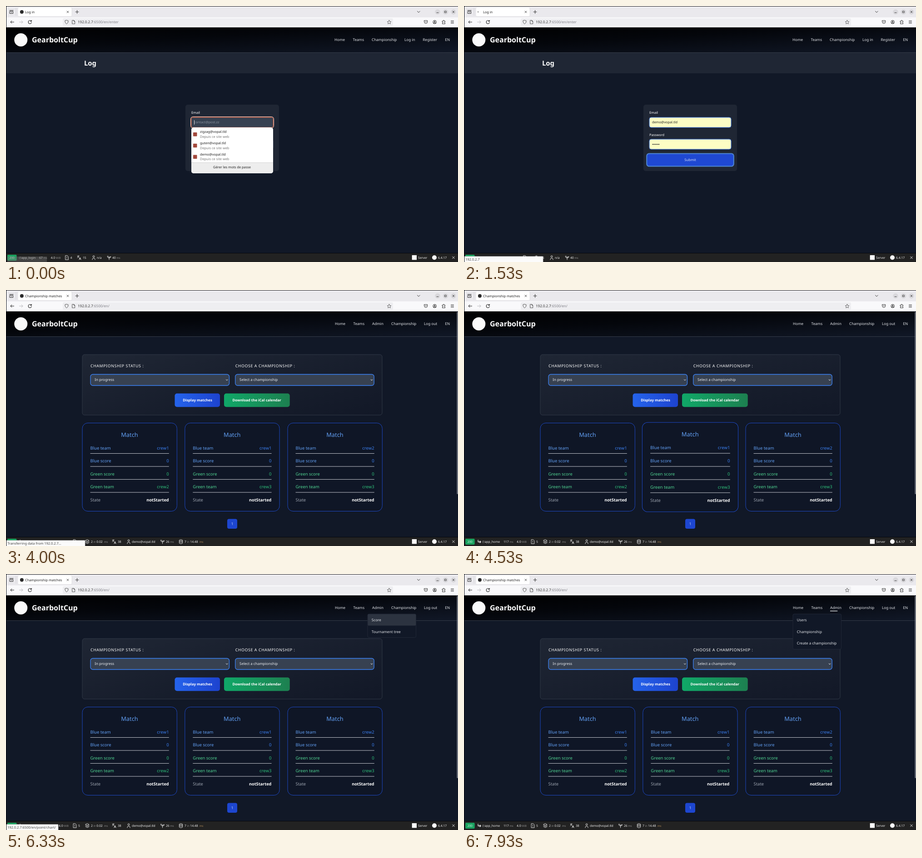
Animation, 995 px wide and 563 px high, one loop 8 s. Source, as an HTML page:

```html
<!DOCTYPE html>
<html lang="en">
<head>
<meta charset="utf-8">
<title>Log in</title>
<style>
html, body { margin: 0; width: 100%; height: 100%; overflow: hidden; background: #111827; }
svg { display: block; width: 995px; height: 563px; }
text { font-family: "Noto Sans", "Open Sans", sans-serif; text-rendering: geometricPrecision; white-space: pre; }
</style>
</head>
<body>
<svg id="stage" viewBox="0 0 995 563" xmlns="http://www.w3.org/2000/svg">
  <defs>
    <linearGradient id="head" x1="0" y1="0" x2="1" y2="1"><stop offset="0" stop-color="#000"/><stop offset=".4" stop-color="#04060b"/><stop offset="1" stop-color="#111827"/></linearGradient>
    <linearGradient id="panel" x1="0" y1="0" x2="1" y2="1"><stop stop-color="#1f2634"/><stop offset="1" stop-color="#121827"/></linearGradient>
    <linearGradient id="blue"><stop stop-color="#2563eb"/><stop offset="1" stop-color="#1d43cf"/></linearGradient>
    <linearGradient id="green"><stop stop-color="#10a868"/><stop offset="1" stop-color="#1d8050"/></linearGradient>
  </defs>
</svg>
<script>
const LOOP = 8000;
const HOST = "192.0.2.7", PORT = ":6500";
const stage = document.getElementById("stage");

function el(parent, tag, attrs) {
  const node = document.createElementNS("http://www.w3.org/2000/svg", tag);
  for (const key in attrs) node.setAttribute(key, attrs[key]);
  return parent.appendChild(node);
}
const group = parent => el(parent, "g", {});
const rect = (p, x, y, width, height, fill, rx = 0, more = {}) =>
  el(p, "rect", { x, y, width, height, fill, rx, ...more });
const circle = (p, cx, cy, r, fill) => el(p, "circle", { cx, cy, r, fill });
const line = (p, d, stroke = "#333", width = 1) =>
  el(p, "path", { d, stroke, "stroke-width": width, fill: "none", "stroke-linecap": "round", "stroke-linejoin": "round" });
function text(p, x, y, str, size, fill, weight = 400, anchor = "start", more = {}) {
  const node = el(p, "text", { x, y, fill, "font-size": size, "font-weight": weight, "text-anchor": anchor, ...more });
  node.textContent = str;
  return node;
}
function rich(p, x, y, parts, size) {
  const node = text(p, x, y, "", size, "#eee");
  for (const [str, fill, scale = 1] of parts)
    el(node, "tspan", { fill, "font-size": size * scale }).textContent = str;
  return node;
}
const cross = (p, x, y, r, stroke = "#333", w = 1) =>
  line(p, `M${x - r} ${y - r}l${2 * r} ${2 * r}m0 ${-2 * r}l${-2 * r} ${2 * r}`, stroke, w);
const ring = (p, cx, cy, r, stroke = "#333", width = 1) =>
  el(p, "circle", { cx, cy, r, fill: "none", stroke, "stroke-width": width });

const show = (node, on) => { node.style.display = on ? "" : "none"; };
const fade = (node, v) => { node.style.opacity = v; };
const span = (t, from, to) => t >= from && t < to;
function ramp(t, from, to) {
  const k = Math.min(1, Math.max(0, (t - from) / (to - from)));
  return k * k * (3 - 2 * k);
}
function pick(t, steps) {
  let value = steps[0][1];
  for (const [time, v] of steps) if (t >= time) value = v;
  return value;
}

// Page
rect(stage, 0, 0, 995, 563, "#111827");
const page = group(stage);
rect(page, 0, 47, 995, 55, "url(#head)");
rect(page, 0, 102, 995, 1, "#353c49");
circle(page, 32.7, 74.5, 14.5, "#fafafa");
text(page, 57, 80, "GearboltCup", 16, "#fff", 700);

const login = group(page), home = group(page);

function nav(parent, items) {
  for (const [x, str] of items) text(parent, x, 76.6, str, 8.15, "#e5e7eb");
}

// Login view
nav(login, [[723, "Home"], [763.5, "Teams"], [805, "Championship"], [877, "Log in"], [917.5, "Register"], [966.5, "EN"]]);
rect(login, 0, 103, 995, 45, "#1f2634");
text(login, 172, 130.7, "Log", 14.8, "#fff", 700);
rect(login, 395, 217, 206, 146, "#1f2634", 5);
text(login, 408, 237.4, "Email", 7.4, "#fff", 500);
text(login, 408, 285.7, "Password", 7.3, "#fff", 500);

function field(y) {
  rect(login, 408, y, 180, 22, "#374151", 4, { stroke: "#4b5a72", "stroke-width": .8 });
  const filled = group(login);
  rect(filled, 408, y, 180, 22, "#fdfdc4", 4, { stroke: "#3b74e8", "stroke-width": 1 });
  return filled;
}
const emailFill = field(245), passFill = field(293);
text(emailFill, 414, 258.4, "demo@vopal.tld", 7.3, "#222");
for (let i = 0; i < 6; i++) circle(passFill, 415.4 + i * 2.75, 304.2, 1.05, "#222");
const hint = text(login, 414, 258.4, "contact@post.zz", 7.25, "#8b93a0");
const caret = line(login, "M414.5 251.5v9", "#fff", .8);
const focus = group(login);
rect(focus, 407.7, 244.7, 180.6, 22.6, "none", 4, { stroke: "#b8583f", "stroke-width": 1.4 });
rect(focus, 406.5, 243.5, 183, 25, "none", 5, { stroke: "#f6d3c9", "stroke-width": 1 });

const submit = group(login);
rect(submit, 408, 326, 180, 25, "#2860e6", 4);
const submitDark = rect(submit, 408, 326, 180, 25, "#1f48d2", 4);
const submitRing = rect(submit, 407.2, 325.2, 181.6, 26.6, "none", 5, { stroke: "#5c9df2", "stroke-width": 2 });
text(submit, 498, 341.2, "Submit", 7.3, "#d4defa", 400, "middle");

// Saved logins list
const list = group(login);
rect(list, 408, 267, 180, 101, "#fff", 5);
const rows = ["zigzag@vopal.tld", "guten@vopal.tld", "demo@vopal.tld"].map((name, i) => {
  const y = 270 + i * 24.7;
  const row = group(list);
  rect(row, 412, y + 8, 8.5, 8.5, "#a2493d", 1);
  text(row, 427, y + 9.2, name, 7.4, "#222");
  text(row, 427, y + 20, "Depuis ce site web", 7.4, "#777");
  const over = group(list);
  rect(over, 408.5, y - .3, 179, 24.7, "#b95c3f");
  rect(over, 413, y + 9, 6.5, 6.5, "#a2493d", 1);
  text(over, 427, y + 9.2, name, 7.4, "#f3d6cc");
  text(over, 427, y + 20, "Depuis ce site web", 7.4, "#dfa48f");
  ring(over, 576, y + 12, 3, "#f6ded5", .9);
  ring(over, 576, y + 12, 3.9, "#f6ded5", .9).setAttribute("stroke-dasharray", "1.5 1.56");
  ring(over, 576, y + 12, 1.2, "#f6ded5", .7);
  return over;
});
el(list, "path", { d: "M408 344h180v19a5 5 0 0 1-5 5h-170a5 5 0 0 1-5-5z", fill: "#ededed" });
rect(list, 408, 344, 180, .8, "#cfcfcf");
text(list, 497.5, 357, "Gérer les mots de passe", 7.36, "#222", 400, "middle");

// Home view
nav(home, [[724, "Home"], [764.5, "Teams"], [806, "Admin"], [848, "Championship"], [920, "Log out"], [966.5, "EN"]]);
rect(home, 168, 142, 660, 133, "url(#panel)", 5, { stroke: "#353d4b", "stroke-width": .9 });
function select(x, label, value) {
  text(home, x, 169.8, label, 8.8, "#fff", 500, "start", { "letter-spacing": .62 });
  rect(home, x, 185.5, 305.5, 24.5, "#374151", 5, { stroke: "#3b82f6", "stroke-width": 1.3 });
  text(home, x + 9.3, 200.3, value, 8, "#eef0f3");
  line(home, `M${x + 298.5} 197l1.8 1.9l1.8-1.9`, "#fff", 1);
}
select(186, "CHAMPIONSHIP STATUS :", "In progress");
select(504.7, "CHOOSE A CHAMPIONSHIP :", "Select a championship");
rect(home, 371.5, 227.5, 99.5, 29.7, "url(#blue)", 5);
text(home, 421.5, 245.2, "Display matches", 7.9, "#fff", 700, "middle");
rect(home, 480, 227.5, 144.7, 29.7, "url(#green)", 5);
text(home, 552.2, 245.2, "Download the iCal calendar", 7.85, "#fff", 700, "middle");

function matchCard(x, blue, green) {
  const card = group(home);
  rect(card, x, 292.5, 208.3, 194, "#0f1626", 12, { stroke: "#1d48c4", "stroke-width": 1 });
  text(card, x + 104, 323.4, "Match", 12.8, "#62a0f5", 500, "middle");
  const lines = [
    ["Blue team", blue, "#62a0f5", "#3b7ff0"],
    ["Blue score", "0", "#62a0f5", "#3b7ff0"],
    ["Green score", "0", "#50d492", "#2fc07a"],
    ["Green team", green, "#50d492", "#2fc07a"],
    ["State", "notStarted", "#9ca3af", "#fff"]
  ];
  lines.forEach(([label, value, c1, c2], i) => {
    const y = 350.5 + i * 28.5, last = i === 4;
    text(card, x + 17.5, y, label, 9.45, c1, last ? 400 : 500);
    text(card, x + 190.6, y, value, last ? 9.15 : 9.5, c2, last ? 700 : 500, "end");
    if (!last) rect(card, x + 17.5, y + 8.6, 173.3, .9, "#d5d8de");
  });
  return card;
}
matchCard(168, "crew1", "crew2");
const midCard = matchCard(393.8, "crew1", "crew3");
matchCard(620, "crew2", "crew3");
rect(home, 487, 503.5, 22, 21.5, "#1d46d0", 4);
text(home, 498, 517.2, "1", 8, "#c3d5fb", 400, "middle");
rect(home, 992.6, 48, 2, 401, "#8b8f97", 1);

function menu(x, w, items) {
  const box = group(home);
  rect(box, x, 88, w, items.length * 25.8, "#111827", 3, { stroke: "#262d3b", "stroke-width": .8 });
  const hover = rect(box, x + .4, 88.3, w - .8, 25.2, "#2c3340", 2);
  items.forEach((str, i) => text(box, x + 8.8, 103.8 + i * 25.8, str, 8.1, "#e5e7eb"));
  return { box, hover };
}
const champMenu = menu(796, 106.6, ["Score", "Tournament tree"]);
const adminMenu = menu(724, 106.6, ["Users", "Championship", "Create a championship"]);
const champLine = rect(home, 848, 80.8, 0, 1.2, "#fff");
const adminLine = rect(home, 806, 80.8, 0, 1.2, "#fff");

// Debug toolbar
rect(stage, 0, 543, 995, 1.2, "#05070c");
rect(stage, 0, 544, 995, 19, "#222");
const bar = group(stage), loginBar = group(stage), homeBar = group(stage);
const GREY = "#8d8d8d", LIGHT = "#eee", TOOL = 6.75;
const tool = (p, x, ...parts) => rich(p, x, 556, parts, TOOL);
const ms = str => [[str, LIGHT], [" ms", GREY, .88]];

const icons = {
  file: (p, x) => line(p, `M${x - 3} 549h4l2.4 2.4v6.6h-6.4zM${x} 552v2m0 2v.2`, LIGHT, .9),
  lang: (p, x) => line(p, `M${x - 4} 550h4.5m-2.2-1v1q-.4 3-2.3 4m1-3l3 3M${x} 558l2-5l2 5m-3.2-1.6h2.4`, LIGHT, .9),
  user: (p, x) => { ring(p, x, 551, 1.9, LIGHT, .9); line(p, `M${x - 3} 558v-1q0-2.4 3-2.4t3 2.4v1`, LIGHT, .9); },
  plant: (p, x) => line(p, `M${x} 558v-4q0-3 4-3q0 3-4 3q-4 0-4-4q4 0 4 4`, LIGHT, .9),
  layers: (p, x) => line(p, `M${x} 549l4 2l-4 2l-4-2zM${x - 4} 553.3l4 2l4-2m-8 2.3l4 2l4-2`, LIGHT, .9),
  base: (p, x) => {
    el(p, "ellipse", { cx: x, cy: 550.5, rx: 3.6, ry: 1.4, fill: "none", stroke: LIGHT, "stroke-width": .9 });
    line(p, `M${x - 3.6} 550.5v6.4q3.6 2.6 7.2 0v-6.4m-7.2 3.2q3.6 2.6 7.2 0`, LIGHT, .9);
  }
};
rect(bar, 3, 547, 20.5, 13, "#1aa260", 2);
text(bar, 13.2, 556, "200", TOOL, "#d8f3e4", 400, "middle");
rect(bar, 893.7, 548, 10.3, 10.3, "#fff");
tool(bar, 907, ["Server", LIGHT]);
circle(bar, 943, 553.2, 5, "#fff");
tool(bar, 951, ["6.4.17", LIGHT]);
cross(bar, 985, 553.3, 2.4, "#ddd", 1);

tool(loginBar, 28, ["@", GREY], ["app_login", LIGHT]);
tool(loginBar, 73, ...ms("67"));
tool(loginBar, 98.5, ["4.0", LIGHT], [" MiB", GREY, .88]);
icons.file(loginBar, 134); tool(loginBar, 141.5, ["4", LIGHT]);
icons.lang(loginBar, 161); tool(loginBar, 169, ["15", LIGHT]);
icons.user(loginBar, 193); tool(loginBar, 200, ["n/a", LIGHT]);
icons.plant(loginBar, 227); tool(loginBar, 234, ...ms("40"));

line(homeBar, "M31 550v4h6m-2-2l2 2l-2 2", LIGHT, 1.3);
tool(homeBar, 39.5, ["@", GREY], ["app_home", LIGHT]);
tool(homeBar, 87, ...ms("117"));
tool(homeBar, 116, ["4.0", LIGHT], [" MiB", GREY, .88]);
icons.file(homeBar, 151.5); tool(homeBar, 159, ["5", LIGHT]);
icons.layers(homeBar, 179); tool(homeBar, 187, ["2", LIGHT], [" in ", GREY, .9], ["0.02 ", LIGHT], [" ms", GREY, .88]);
icons.lang(homeBar, 238); tool(homeBar, 246, ["38", LIGHT]);
icons.user(homeBar, 270); tool(homeBar, 277, ["demo@vopal.tld", LIGHT]);
icons.plant(homeBar, 344.5); tool(homeBar, 352, ...ms("26"));
icons.base(homeBar, 385); tool(homeBar, 393, ["7", LIGHT], [" in ", GREY, .9], ["14.48 ", LIGHT], [" ms", "#b08a5a", .88]);

// Link and loading status
const ghost = rect(stage, 3, 551, 87, 12, "#777", 0, { opacity: .4 });
const status = group(stage);
const statusBox = rect(status, 0, 550.7, 174, 13, "#fbfbfb", 1, { stroke: "#c8c8c8", "stroke-width": .6 });
const statusText = text(status, 3, 559.8, "", 7.45, "#444");

// Browser frame
const chrome = group(stage);
rect(chrome, 0, 0, 995, 25.5, "#eae9ed");
rect(chrome, 0, 25, 995, 22, "#f9f9fb");
rect(chrome, 0, 0, 995, 1, "#222");
rect(chrome, 0, 0, 1, 563, "#0a0d14");
rect(chrome, 26, 3, 119, 20, "#fff", 2.5, { stroke: "#d2d1d6", "stroke-width": .6 });
rect(chrome, 125, 27.3, 727, 16, "#eeeef1", 2.5);
line(chrome, "M8 9.5h8M8.5 11.5h7v5h-7zM10.6 13.2l1.4 1.4l1.4-1.4", "#333", 1);
line(chrome, "M22 5v16", "#cfced3", .8);
cross(chrome, 136, 13, 2, "#444", .9);
line(chrome, "M153 13h7m-3.5-3.5v7", "#333", 1);
line(chrome, "M905.5 11.5l2.8 2.8l2.8-2.8", "#333", 1);
for (const x of [950, 967.5, 985]) circle(chrome, x, 13, 5.8, "#d9d8dc");
line(chrome, "M948 14.7h4M965.8 11.3h3.4v3.4h-3.4z", "#333", .9);
cross(chrome, 985, 13, 1.8, "#333", .9);
line(chrome, "M17.5 35.3h-7.5m3-3l-3 3l3 3", "#222", 1);
line(chrome, "M29.5 35.3h7.5m-3-3l3 3l-3 3", "#b9b9bd", 1);
const reload = line(chrome, "M55.4 33a3.6 3.6 0 1 0 .8 3M56.2 31.2v2.4h-2.4", "#222", 1.1);
const stop = cross(chrome, 52.5, 35.3, 2.8, "#222", 1.1);
line(chrome, "M133.5 31.3l3.6 1.2q.2 5-3.6 7q-3.8-2-3.6-7z", "#444", .9);
line(chrome, "M146 31.5h3.4l2.2 2.2v5.5h-5.6zM149.4 31.5v2.2h2.2", "#444", .9);
line(chrome, "M843.5 31.2l1.3 2.8l3 .4l-2.2 2l.6 3l-2.7-1.5l-2.7 1.5l.6-3l-2.2-2l3-.4z", "#444", .8);
line(chrome, "M920.7 32h7v3q0 3.5-3.5 3.5t-3.5-3.5zM922.6 34.2l1.6 1.6l1.6-1.6", "#333", 1);
ring(chrome, 943.7, 35.3, 3.8);
circle(chrome, 943.7, 34.2, 1.4, "#333");
line(chrome, "M941.5 37.5q2.2-1.8 4.4 0", "#333", 1.2);
line(chrome, "M960.5 33h2v-1.5h2v1.5h2v2.2h-1.4v2h1.4v2.2h-6v-2.2h1.4v-2h-1.4z", "#333", .9);
line(chrome, "M979.5 32.6h6m-6 2.7h6m-6 2.7h6", "#333", 1);
const favicon = circle(chrome, 34.8, 13, 4, "#2b2b2b");
const spinner = circle(chrome, 31, 13, 1.1, "#555");
const title = text(chrome, 42, 15.8, "", 7.35, "#222");
const address = rich(chrome, 158, 38.2, [[HOST, "#333"], ["", "#808088"]], 8);

const DOT = [[1400, 31], [1800, 34], [1930, 38], [2200, 34], [2460, 31], [2600, 34], [2860, 31], [3000, 37], [3330, 34], [3530, 31]];
const TITLE = [[0, "Log in"], [3330, HOST + PORT + "/en/"], [4000, "Championship matches"]];
const PATH = [[0, "/en/enter"], [3330, "/en/"]];
const STATUS = [
  [0, ""], [1400, HOST], [1730, `Waiting for ${HOST}…`], [3330, `Transferring data from ${HOST}…`], [4330, ""],
  [5800, HOST + PORT + "/en/point/chart/"], [6600, ""]
];
const ROW = [[0, -1], [200, 0], [260, 1], [600, 2]];

function setText(node, str) {
  if (node.textContent !== str) node.textContent = str;
}
function zoom(node, s, cx, cy) {
  node.setAttribute("transform", `translate(${cx} ${cy}) scale(${s}) translate(${-cx} ${-cy})`);
}

function render(t) {
  const atHome = t >= 3800, filled = t >= 800, loading = span(t, 1400, 4000);
  show(login, !atHome);
  show(home, atHome);
  show(loginBar, t < 4000);
  show(homeBar, t >= 4000);

  show(list, !filled);
  rows.forEach((row, i) => show(row, pick(t, ROW) === i));
  show(caret, t < 260);
  show(hint, !filled);
  show(emailFill, filled);
  show(passFill, filled);
  show(focus, t < 1400);
  const hover = ramp(t, 800, 1000) - ramp(t, 2460, 2660);
  zoom(submit, 1 + .055 * hover, 498, 338.5);
  fade(submitDark, hover);
  fade(submitRing, ramp(t, 1400, 1530) * (1 - .2 * hover));

  zoom(midCard, 1 + .014 * (ramp(t, 4130, 4330) - ramp(t, 4790, 4900)), 498, 389.5);
  fade(champMenu.box, ramp(t, 5200, 5460) - ramp(t, 6730, 6930));
  fade(champMenu.hover, ramp(t, 5600, 5800) - ramp(t, 6460, 6600));
  const champ = ramp(t, 5200, 5460) - ramp(t, 5600, 5800) + ramp(t, 6460, 6660) - ramp(t, 6730, 6930);
  champLine.setAttribute("width", Math.max(0, 55 * champ));
  fade(adminMenu.box, ramp(t, 7330, 7600));
  fade(adminMenu.hover, 0);
  adminLine.setAttribute("width", 25 * Math.max(0, (t - 7600) / 510));

  show(ghost, t < 60);
  const note = pick(t, STATUS);
  show(status, note !== "");
  setText(statusText, note);
  statusBox.setAttribute("width", atHome && t > 5000 ? 115 : 174);

  show(favicon, !loading);
  show(spinner, loading);
  spinner.setAttribute("cx", pick(t, DOT));
  show(stop, span(t, 1730, 4000));
  show(reload, !span(t, 1730, 4000));
  setText(title, pick(t, TITLE));
  setText(address.lastChild, PORT + pick(t, PATH));
}

const start = performance.now();
function tick() {
  render((performance.now() - start) % LOOP);
  requestAnimationFrame(tick);
}
tick();
</script>
</body>
</html>
```
